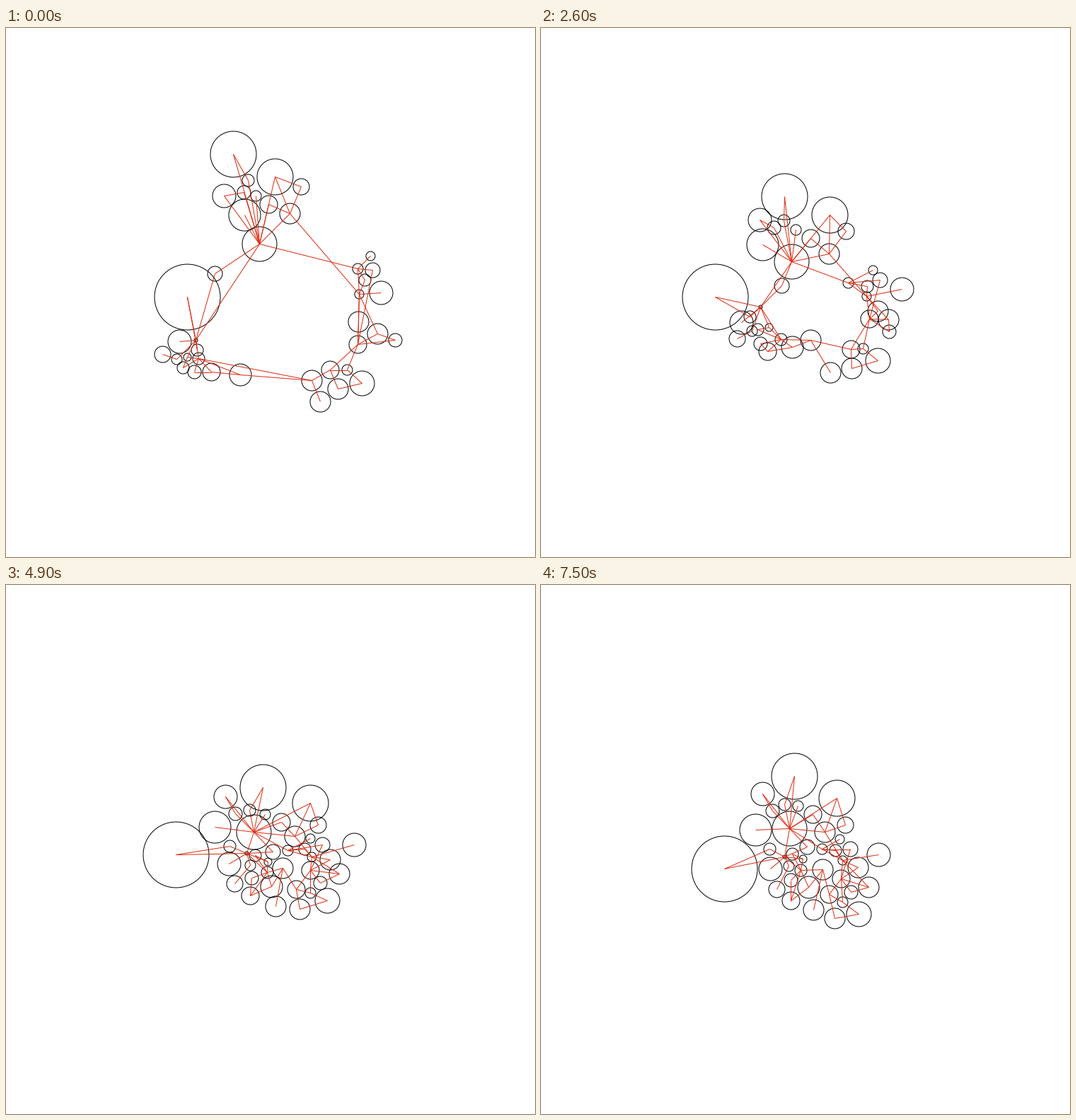
A matplotlib script that plays this animation: 748 px wide and 748 px high, repeating every 7.6 s.

```python
import numpy as np
import matplotlib.pyplot as plt
from matplotlib.animation import FuncAnimation
from matplotlib.collections import LineCollection

SIZE, DPI, FRAMES, STEP_MS = 748, 100, 76, 100
LAST = FRAMES - 1
GATHERED = 49               # frame at which the bodies have closed in
CENTRE = np.array([375, 380])
LINE_RED = "#d92b10"

nodes = {}


def node(name, radius, start, end):
    nodes[name] = radius, start, end


# top cluster
node("A", 32.5, (321, 178), (358, 270))
node("B", 25.5, (380, 210), (418, 301))
node("C", 11.5, (417, 224), (430, 339))
node("D", 8.5, (342, 215), (344, 310))
node("E", 9.5, (336, 232), (327, 319))
node("F", 7.5, (353, 237), (363, 312))
node("G", 16.5, (308, 237), (313, 295))
node("H", 12.5, (371, 249), (384, 324))
node("I", 22.5, (337, 264), (303, 346))
node("J", 14.5, (401, 262), (401, 349))
node("K", 24.5, (358, 305), (351, 344))

# left cluster
node("L", 10.5, (295, 347), (376, 370))
node("M", 46.5, (256, 380), (259, 401))
node("N", 2.5, (268, 441), (344, 384))
node("O", 16.5, (245, 443), (324, 401))
node("P", 11.5, (221, 461), (333, 430))
node("Q", 7.5, (241, 468), (350, 397))
node("R", 8.5, (250, 480), (355, 380))
node("S", 5.5, (256, 465), (370, 387))
node("T", 8.5, (270, 455), (323, 373))
node("U", 8.5, (272, 467), (367, 403))

# bottom
node("V", 9.5, (266, 486), (353, 417))
node("W", 12.5, (290, 486), (353, 446))
node("X", 15.5, (331, 490), (378, 427))
node("Y", 14.5, (432, 498), (398, 402))
node("Z", 14.5, (444, 528), (385, 459))
node("a", 12.5, (458, 483), (407, 437))
node("b", 7.5, (482, 483), (426, 448))
node("c", 14.5, (469, 510), (415, 471))
node("d", 17.5, (503, 502), (449, 465))

# right cluster
node("e", 12.5, (497, 447), (424, 415))
node("f", 14.5, (525, 432), (463, 427))
node("g", 9.5, (550, 441), (438, 434))
node("h", 14.5, (498, 415), (448, 399))
node("i", 16.5, (530, 374), (477, 381))
node("j", 6.5, (499, 376), (426, 389))
node("k", 8.5, (507, 356), (416, 375))
node("l", 10.5, (518, 342), (437, 373))
node("m", 7.5, (497, 340), (397, 373))
node("n", 6.5, (515, 322), (422, 359))

LINKS = (
    "KA AD DK KE EG GK KF KI KH HJ KB BC CJ BJ KJ Jj Km KL KN LN "
    "NM MT TN NO NQ QP NS SR SU RU NU UV VW WU UX WX UY XY YZ Ya "
    "ab ac cd db ae be ef eg fg eh hj je el jf ij jk mj mk ml mn"
).split()

names = list(nodes)
radii, start, end = (np.array(v, float) for v in zip(*nodes.values()))
ends = np.array([[names.index(p), names.index(q)] for p, q in LINKS])

# light, well connected bodies are first drawn to the mean of their neighbours
linked = np.zeros((len(names), len(names)))
linked[ends[:, 0], ends[:, 1]] = linked[ends[:, 1], ends[:, 0]] = 1
degree = linked.sum(axis=1)
free = (degree > 2) & (radii < 20)
pull = (linked @ start / degree[:, None] - start) * free[:, None]

# the whole group is squeezed on impact, its sides riding up
x, y = (end - CENTRE).T
squeeze = np.column_stack([0.15 * x - 0.07 * y, 6 - 0.12 * y - 0.2 * abs(x)])

angle = np.linspace(0, 2 * np.pi, 91)
ring = np.column_stack([np.cos(angle), np.sin(angle)])


def centres(t):
    gather = np.sin(np.pi / 2 * min(t / GATHERED, 1)) ** 2
    tug = t / 18 * np.exp(1 - t / 18) * (1 - t / LAST)
    impact = np.sin(np.pi * (t / LAST) ** 1.5)
    pos = start + (end - start) * gather + pull * tug + squeeze * impact
    return np.round(pos) + 0.5


fig = plt.figure(figsize=(SIZE / DPI, SIZE / DPI), dpi=DPI, facecolor="white")
ax = fig.add_axes([0, 0, 1, 1])
ax.set(xlim=(0, SIZE), ylim=(SIZE, 0))
ax.axis("off")

px = 72 / DPI
circles = LineCollection([], colors="black", linewidths=px, zorder=1)
links = LineCollection([], colors=LINE_RED, linewidths=px, zorder=2)
ax.add_collection(circles)
ax.add_collection(links)


def draw(frame):
    pos = centres(frame)
    circles.set_segments(pos[:, None] + radii[:, None, None] * ring)
    links.set_segments(pos[ends])
    return circles, links


anim = FuncAnimation(fig, draw, frames=FRAMES, interval=STEP_MS, repeat=True, repeat_delay=0)
plt.show()
```
